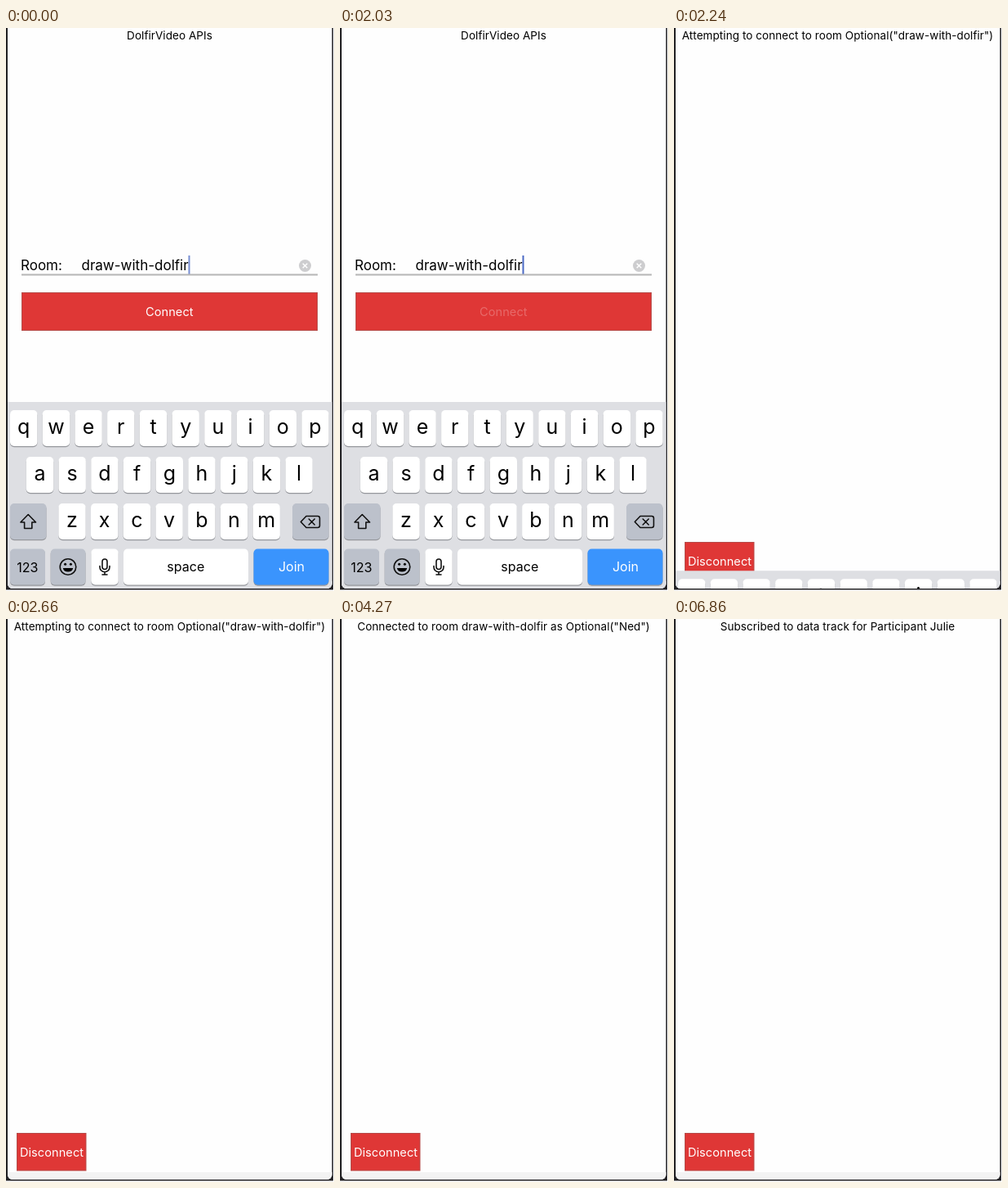
These frames come from a looping animation (402x688 px, 8000 ms). An HTML page:

```html
<!DOCTYPE html>
<html lang="en">
<head>
<meta charset="utf-8">
<title>Join a room</title>
<style>
  html, body { margin: 0; width: 100%; height: 100%; overflow: hidden; background: #fff; }
  svg { display: block; font-family: Inter, Roboto, sans-serif; }
  .mid { text-anchor: middle; }
  .status { font-size: 13.5px; letter-spacing: 0.07px; }
  .field { font-size: 17px; }
  .button { font-size: 14.6px; letter-spacing: 0.05px; fill: #fff; }
  .letter { font-size: 25px; }
  .label { font-size: 16px; }
  .red { fill: #df3736; stroke: #b54b48; }
  .icon { fill: none; stroke: #111; stroke-width: 1.6; stroke-linejoin: round; stroke-linecap: round; }
</style>
</head>
<body>
<svg width="402" height="688" viewBox="0 0 402 688">
  <clipPath id="screen"><rect x="2" y="-10" width="397.5" height="695" rx="6"/></clipPath>
  <rect width="401" height="686.5" fill="#222124"/>
  <g clip-path="url(#screen)">
    <rect width="402" height="688" fill="#fefefe"/>
    <rect y="676" width="402" height="12" fill="#f3f3f3"/>
    <text id="status" class="mid status" x="200.5" y="13.5"></text>

    <g id="form">
      <text class="field" x="18" y="296">Room:</text>
      <text class="field" x="92.5" y="296">draw-with-dolfir</text>
      <rect id="caret" x="223.5" y="278" width="2" height="23" fill="#4a69c4"/>
      <rect x="19" y="300.5" width="363" height="2" fill="#b6b6b6"/>
      <circle cx="366.5" cy="290.5" r="7.5" fill="#cdcdcf"/>
      <path d="M363.7 287.7l5.6 5.6m0-5.6l-5.6 5.6" stroke="#fff" stroke-width="1.4"/>
      <rect class="red" x="19.5" y="323.5" width="362" height="46"/>
      <text id="connect" class="mid button" x="200.3" y="352">Connect</text>
    </g>

    <g id="leave">
      <rect class="red" x="13.5" y="628.5" width="84.5" height="45.5"/>
      <text class="mid button" x="56" y="657">Disconnect</text>
    </g>

    <g id="keyboard"></g>
  </g>
</svg>
<script>
const LOOP = 8000, STEP = 70, SENT = 2100;
const KEYBOARD_HEIGHT = 231, SLIDE_START = 2008, SLIDE_RATE = 0.0164;
const WHITE = '#fff', GREY = '#bcc1cb', BLUE = '#3a94fd';

const messages = [
  [0, 'DolfirVideo APIs'],
  [SENT, 'Attempting to connect to room Optional("draw-with-dolfir")'],
  [3080, 'Connected to room draw-with-dolfir as Optional("Ned")'],
  [6160, 'Subscribed to data track for Participant Julie'],
];

const $ = id => document.getElementById(id);
const clamp = v => Math.max(0, Math.min(1, v));

const key = (x, y, w, fill = WHITE) =>
  `<rect x="${x}" y="${y + 1.2}" width="${w}" height="44" rx="5" fill="#95979c"/>
   <rect x="${x}" y="${y}" width="${w}" height="44" rx="5" fill="${fill}"/>`;

const label = (text, x, y, kind = 'label', fill = '#000') =>
  `<text class="mid ${kind}" x="${x}" y="${y}" fill="${fill}">${text}</text>`;

const letterRow = (letters, x, y) => [...letters].map((c, i) => {
  const cx = x + i * 39.7;
  return key(cx - 16.7, y, 33.4) + label(c, cx, y + 29, 'letter');
}).join('');

const icons = `
  <path class="icon" d="M27.2 594.5l9.3 9.5h-4.7v7.5h-9.2v-7.5h-4.7z"/>
  <path class="icon" d="M368 596.5h14q2.5 0 2.5 2.5v9q0 2.5-2.5 2.5h-14l-6.7-7z
    M371.2 600l7 7m0-7l-7 7"/>
  <circle class="icon" cx="76" cy="658.5" r="9.8"/>
  <circle cx="72.6" cy="655.3" r="1.5"/><circle cx="79.4" cy="655.3" r="1.5"/>
  <path d="M69.8 660h12.4a6.3 5.6 0 0 1-12.4 0z"/>
  <rect class="icon" x="118" y="649" width="6" height="12.5" rx="3"/>
  <path class="icon" d="M115 657.5v1.5a6 5.7 0 0 0 12 0v-1.5M121 664.7v3.3m-3 0h6"/>`;

$('keyboard').innerHTML =
  `<rect y="457" width="402" height="240" fill="#dedfe3"/>` +
  letterRow('qwertyuiop', 21.7, 467) +
  letterRow('asdfghjkl', 41.5, 524) +
  letterRow('zxcvbnm', 81, 581) +
  key(5, 581, 44.5, GREY) + key(351, 581, 44.5, GREY) +
  key(5, 636.5, 43, GREY) + key(54.7, 636.5, 42.8, GREY) +
  key(104.3, 636.5, 33.4) + key(144, 636.5, 153) + key(303.5, 636.5, 92, BLUE) +
  label('123', 26.3, 664.5) + label('space', 220.3, 664) +
  label('Join', 350, 664, 'label', WHITE) + icons;

// Critically damped slide out of the screen
function slide(t) {
  if (t < SENT) return 0;
  const u = (t - SLIDE_START) * SLIDE_RATE;
  return KEYBOARD_HEIGHT * (1 - Math.exp(-u) * (1 + u));
}

// Fades in around each full second and out around the half
function caretAlpha(t) {
  const p = (t + 90) % 1000;
  return p < 500 ? clamp(p / 120) : clamp((650 - p) / 150);
}

function draw(now) {
  const t = Math.floor(now % LOOP / STEP) * STEP;
  const sent = t >= SENT;
  const text = messages.filter(([start]) => t >= start).pop()[1];
  if ($('status').textContent !== text) $('status').textContent = text;
  $('form').style.display = sent ? 'none' : '';
  $('leave').style.display = sent ? '' : 'none';
  $('caret').setAttribute('opacity', caretAlpha(t));
  $('connect').setAttribute('opacity', t >= 1960 ? 0.25 : 1);
  $('keyboard').setAttribute('transform', `translate(0 ${slide(t)})`);
}

const start = performance.now();
function tick() {
  draw(performance.now() - start);
  requestAnimationFrame(tick);
}
tick();
</script>
</body>
</html>
```
